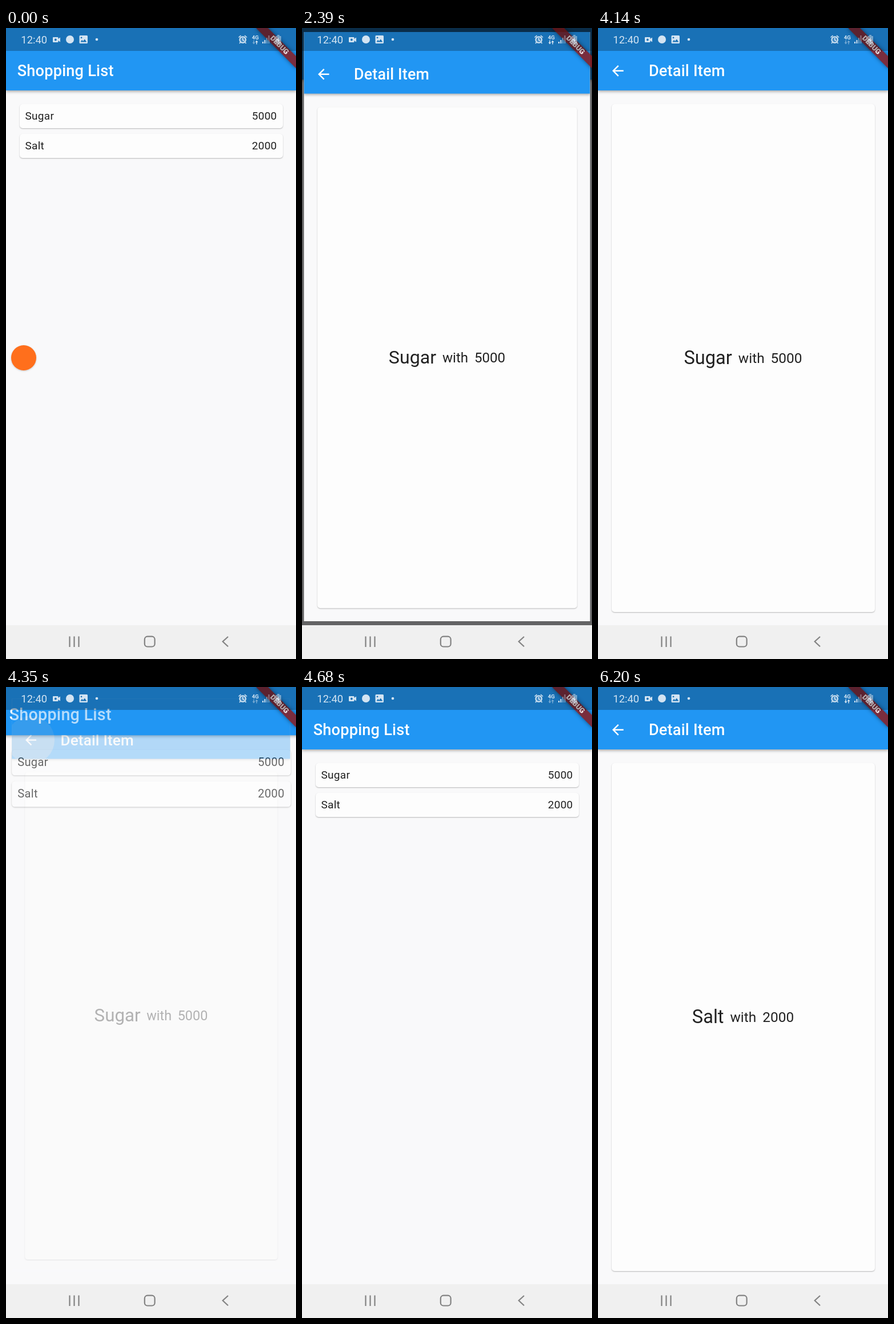
These frames come from a looping animation (508x1102 px, 6640 ms). An HTML page:

```html
<!DOCTYPE html>
<html lang="en">
<head>
<meta charset="utf-8">
<title>Shopping List</title>
<style>
  html, body { margin: 0; width: 100%; height: 100%; overflow: hidden; background: #fafafa; }
  body { font-family: Roboto, sans-serif; color: #212121; }
  #stage, #app, .page, #scrim, svg.layer { position: absolute; left: 0; top: 0; width: 508px; }
  #stage, svg.layer { height: 1102px; overflow: hidden; }
  #app, .page, #scrim { height: 1043px; overflow: hidden; }
  .page { background: #f9f9fa; }
  #scrim { background: #000; }

  .bar {
    position: absolute; inset: 0 0 auto; height: 109.1px; padding: 40px 0 0 19.75px;
    box-sizing: border-box; display: flex; align-items: center; overflow: hidden;
    background: #2196f3; color: #fff; box-shadow: 0 2px 5px rgba(0,0,0,.34);
    font-weight: 500; font-size: 27.16px; letter-spacing: .185px; white-space: nowrap;
  }
  #detail .bar { padding-left: 88.9px; }
  .bar svg { position: absolute; left: 19.8px; top: 59.7px; width: 29.6px; height: 29.6px; }
  #ripple {
    position: absolute; left: -8.6px; top: 31.3px; width: 86.4px; height: 86.4px;
    border-radius: 50%; background: rgba(200,200,200,.4);
  }

  .card {
    position: absolute; left: 23.5px; width: 461px; box-sizing: border-box; display: flex;
    align-items: center; background: #fdfdfd; border-radius: 5px;
    box-shadow: 0 1px 2px rgba(0,0,0,.27);
  }
  .row {
    height: 42.1px; padding: 0 9.9px; justify-content: space-between;
    font-size: 19px; letter-spacing: .31px;
  }
  #item { top: 132.6px; height: 887px; justify-content: center; gap: 11px; font-size: 24.45px; }
  #name { font-size: 32.6px; }

  #bubble {
    position: absolute; left: 9px; top: 554px; width: 44px; height: 44px; border-radius: 50%;
    background: #ff6f1c; box-shadow: 0 1px 3px rgba(0,0,0,.2);
  }
  #banner {
    position: absolute; left: 458.6px; top: 34.6px; width: 98.8px; height: 14.8px;
    transform-origin: 49.4px -34.6px; transform: rotate(45deg);
    background: linear-gradient(rgba(183,28,28,.63) 0 100%), rgba(0,0,0,.5);
    box-shadow: 0 0 7px rgba(0,0,0,.5); color: rgba(255,255,255,.9);
    font-weight: 900; font-size: 12.6px; line-height: 14.8px; text-align: center;
  }
</style>
</head>
<body>
<div id="stage">
  <div id="app">
    <div class="page" id="list">
      <div class="bar">Shopping List</div>
      <div class="card row" style="top:132.6px"><span>Sugar</span><span>5000</span></div>
      <div class="card row" style="top:184.6px"><span>Salt</span><span>2000</span></div>
    </div>
    <div id="scrim"></div>
    <div class="page" id="detail">
      <div class="bar">
        <i id="ripple"></i>
        <svg viewBox="0 0 24 24" fill="#fff"><path d="M20 11H7.83l5.59-5.59L12 4l-8 8 8 8 1.41-1.41L7.83 13H20z"/></svg>
        Detail Item
      </div>
      <div class="card" id="item"><span id="name"></span><span>with</span><span id="price"></span></div>
    </div>
    <div id="banner">DEBUG</div>
  </div>
  <div id="bubble"></div>

  <svg class="layer" viewBox="0 0 508 1102">
    <rect width="508" height="40" fill="#000" opacity=".25"/>
    <g fill="#d3e4f2">
      <text x="26.3" y="27" font-size="18.4">12:40</text>
      <!-- camera, app notice, picture, more -->
      <path fill-rule="evenodd" d="M83 16h7.5q1 0 1 1v2l3.500-2.500v8l-3.500-2.500v2q0 1-1 1H83q-1 0-1-1v-7q0-1 1-1zM86.800 18.600a1.900 1.900 0 1 0 .1 0z"/>
      <circle cx="112" cy="20" r="7"/>
      <path fill-rule="evenodd" d="M130 13h11.500q1.500 0 1.500 1.500v11q0 1.500-1.500 1.500H130q-1.500 0-1.500-1.500v-11q0-1.500 1.500-1.500zM130.500 24.500h10.800l-3.500-5-2.800 3.500-2-2.300zM132 15.500a1.400 1.400 0 1 0 .1 0z"/>
      <circle cx="159" cy="20" r="2.300"/>
      <!-- alarm -->
      <g fill="none" stroke="#d3e4f2" stroke-width="2">
        <circle cx="414.700" cy="20.500" r="5.300" fill="#d3e4f2" fill-opacity=".25"/>
        <path d="M407.500 16.500l4-3.300M422 16.500l-4-3.300M410.500 25l-1.500 2M419 25l1.500 2M414.700 17v4l2.800 1.500" stroke-width="1.600"/>
      </g>
      <text x="430.700" y="19.800" font-size="9.500" font-weight="700">4G</text>
      <path id="down" d="M433.300 21.500h1.500v3.500h1.700l-2.450 3.500-2.450-3.500h1.700z"/>
      <path id="up" d="M438.300 28.500h1.500v-3.500h1.700l-2.450-3.500-2.450 3.500h1.700z"/>
      <!-- signal and battery -->
      <path d="M449 24h2v3h-2zM452.500 21h2v6h-2z"/>
      <path d="M456 17h2v10h-2zM459.500 13h2v14h-2z" opacity=".45"/>
      <path d="M475 12h4v2h2q1 0 1 1v12q0 1-1 1h-8q-1 0-1-1V15q0-1 1-1h2z" opacity=".5"/>
      <path d="M478 16l-4 6h2.500l-.5 4.500 4-6h-2.500z"/>
    </g>
    <rect y="1043" width="508" height="59" fill="#f0f0f0"/>
    <g fill="none" stroke="#828282" stroke-width="2.200">
      <path d="M111.500 1062.500v18.500M119.500 1062.500v18.500M127.500 1062.500v18.500M389 1063l-9.300 8.500 9.300 8.800"/>
      <rect x="242.800" y="1062.700" width="17.800" height="17.800" rx="5"/>
    </g>
  </svg>
</div>

<script>
const LOOP = 6640, DURATION = 300;
const el = id => document.getElementById(id);
const [list, scrim, detail, bubble] = ['list', 'scrim', 'detail', 'bubble'].map(el);

// The screen refreshes only every `step` ms; `lead` is the time already elapsed at the first refresh.
const moves = [
  { at: 2390, lead: 135, step: 110, push: true, item: ['Sugar', '5000'] },
  { at: 4350, lead: 50, step: 110, push: false, item: ['Sugar', '5000'] },
  { at: 5990, lead: 100, step: 105, push: true, item: ['Salt', '2000'] },
];

const clamp = v => Math.min(1, Math.max(0, v));
const interval = (t, from, to) => clamp((t - from) / (to - from));

function cubic(x1, y1, x2, y2, x) {
  const at = (a, b, s) => 3 * (1 - s) ** 2 * s * a + 3 * (1 - s) * s * s * b + s ** 3;
  let low = 0, high = 1;
  for (let i = 0; i < 24; i++) {
    const mid = (low + high) / 2;
    if (at(x1, x2, mid) < x) low = mid; else high = mid;
  }
  return at(y1, y2, low);
}

// Quick start, very slow finish
const emphasized = t => t >= 1 ? 1 : t < 1 / 6
  ? 0.4 * cubic(0.05, 0, 0.1333, 0.06, t * 6)
  : 0.4 + 0.6 * cubic(0.2083, 0.82, 0.25, 1, (t - 1 / 6) * 1.2);

function pose(node, scale, opacity) {
  node.style.transform = scale === 1 ? 'none' : `scale(${scale})`;
  node.style.opacity = opacity;
  node.style.visibility = opacity > 0 ? 'visible' : 'hidden';
}

function draw(time) {
  const move = moves.filter(m => time >= m.at).pop();
  if (!move) {
    pose(list, 1, 1);
    pose(detail, 1, 0);
    scrim.style.opacity = 0;
  } else {
    const elapsed = move.lead + Math.floor((time - move.at) / move.step) * move.step;
    const t = clamp(elapsed / DURATION), p = emphasized(t);
    if (move.push) {
      pose(list, 1 + 0.05 * p, 1);
      pose(detail, 0.85 + 0.15 * p, interval(t, 0.125, 0.25));
      scrim.style.opacity = 0.6 * interval(t, 0.2075, 0.4175);
    } else {
      pose(list, 1.1 - 0.1 * p, 1);
      pose(detail, 1 - 0.1 * p, 1 - interval(t, 0.0825, 0.2075));
      scrim.style.opacity = 0;
    }
    [el('name').textContent, el('price').textContent] = move.item;
    el('ripple').style.display = move.push ? 'none' : 'block';
  }

  const fadeStep = time < 110 ? 0 : 1 + Math.floor((time - 110) / 108.3);
  bubble.style.opacity = clamp(1 - fadeStep / 7);

  const idle = time >= 4140 && time < 5990;
  el('down').style.opacity = idle || time < 110 ? 0.5 : 1;
  el('up').style.opacity = idle ? 0.5 : 1;
}

const start = performance.now();
function tick() {
  draw((performance.now() - start) % LOOP);
  requestAnimationFrame(tick);
}
tick();
</script>
</body>
</html>
```
